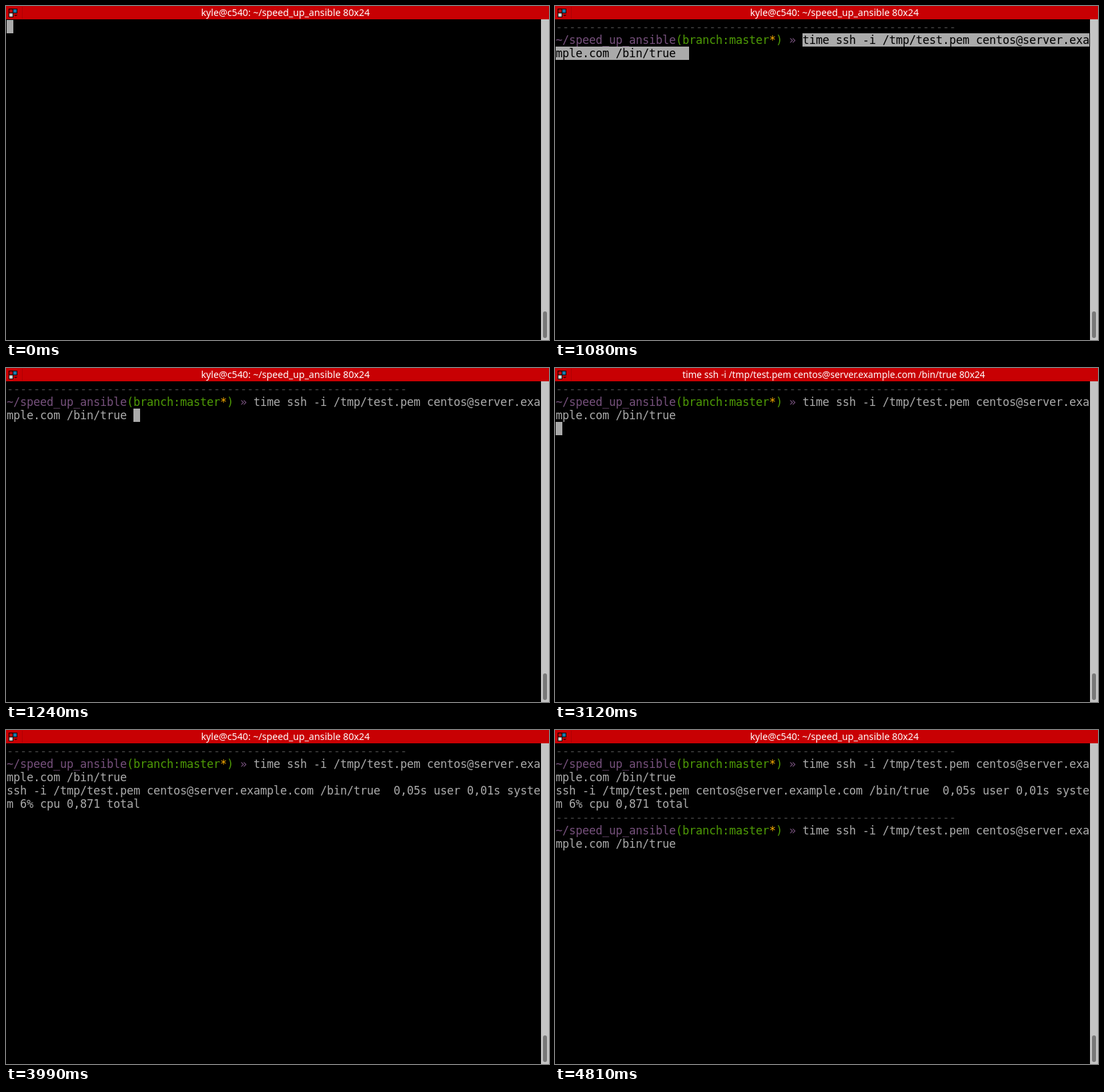
Recreate the animation shown at these times as an HTML page with a canvas. Size 814 by 502 pixels, loop 8000 ms.

```html
<!DOCTYPE html>
<html lang="en">
<head>
<meta charset="utf-8">
<title>Terminal</title>
<style>
  html, body { margin: 0; width: 100%; height: 100%; overflow: hidden; background: #000; }
  canvas { display: block; }
</style>
</head>
<body>
<canvas id="stage" width="814" height="502"></canvas>
<script>
const ctx = document.getElementById('stage').getContext('2d');
const LOOP = 8000, CELL_W = 10, CELL_H = 20, COLS = 80;
const FG = '#aaaaaa', GRAY = '#444444', PURPLE = '#75507b', GREEN = '#4e9a06', ORANGE = '#ffaf00';
const USER = 'kyle@c540';
const SSH = 'ssh -i /tmp/test.pem centos@server.example.com /bin/true';
const COMMAND = 'time ' + SSH;
const TIMING = SSH + '  0,05s user 0,01s system 6% cpu 0,871 total';
const PROMPT_END = 37;

function rect(x, y, w, h, color) {
  ctx.fillStyle = color;
  ctx.fillRect(x, y, w, h);
}

function cell(row, col, color = FG) {
  rect(1 + col * CELL_W, 21 + row * CELL_H, CELL_W, CELL_H, color);
}

// Prints on the character grid, wrapping at the last column.
function print(row, col, text, color = FG, background) {
  ctx.font = '17px "DejaVu Sans Mono", monospace';
  for (const char of text) {
    if (col === COLS) { col = 0; row++; }
    if (background) cell(row, col, background);
    ctx.fillStyle = color;
    ctx.fillText(char, 1 + col * CELL_W, 37 + row * CELL_H);
    col++;
  }
}

function prompt(row) {
  print(row, 0, '-'.repeat(60), GRAY);
  print(row + 1, 0, '~/speed_up_ansible', PURPLE);
  print(row + 1, 18, '(branch:master', GREEN);
  print(row + 1, 32, '*', ORANGE);
  print(row + 1, 33, ')', GREEN);
  print(row + 1, 35, '»', PURPLE);
}

function rightPrompt(row) {
  print(row, 70, USER, GRAY);
}

function frameWindow(running) {
  rect(0, 0, 814, 502, '#000');
  rect(0, 0, 814, 20, '#c80003');
  rect(24, 1, 1, 18, '#b00003');

  // Group button
  rect(4, 4, 13, 7, '#000');
  rect(4, 10, 7, 7, '#000');
  rect(5, 5, 5, 5, '#b80808');
  rect(11, 5, 5, 5, '#1878a8');
  rect(5, 11, 5, 5, '#d0d0d0');
  rect(12, 13, 5, 1, '#500');
  rect(13, 14, 3, 1, '#500');

  ctx.fillStyle = '#fff';
  ctx.font = `${running ? 13.75 : 14.2}px "Noto Sans", "Open Sans", sans-serif`;
  const title = running ? COMMAND : USER + ': ~/speed_up_ansible';
  ctx.fillText(title + ' 80x24', running ? 191 : 292.5, 15);

  rect(802, 20, 12, 482, '#c4c4c4');
  ctx.fillStyle = '#787878';
  ctx.beginPath();
  ctx.roundRect(805, 459, 6, 40, 3);
  ctx.fill();
}

function draw(t) {
  frameWindow(t >= 3120 && t < 3990);
  if (t < 20) return cell(0, 0);

  prompt(0);
  if (t < 1080) {
    rightPrompt(1);
    cell(1, PROMPT_END);
    return;
  }

  // Pasted text stays highlighted briefly.
  const pasted = t < 1240;
  print(1, PROMPT_END, COMMAND + ' ', pasted ? '#000' : FG, pasted && FG);
  if (t < 3020) return cell(2, 19);
  if (t < 3990) return cell(3, 0);

  print(3, 0, TIMING);
  if (t < 4010) return;
  prompt(5);
  if (t < 4810) rightPrompt(6);
  else print(6, PROMPT_END, COMMAND);
}

const start = performance.now();
function tick() {
  draw((performance.now() - start) % LOOP);
  requestAnimationFrame(tick);
}
tick();
</script>
</body>
</html>
```
